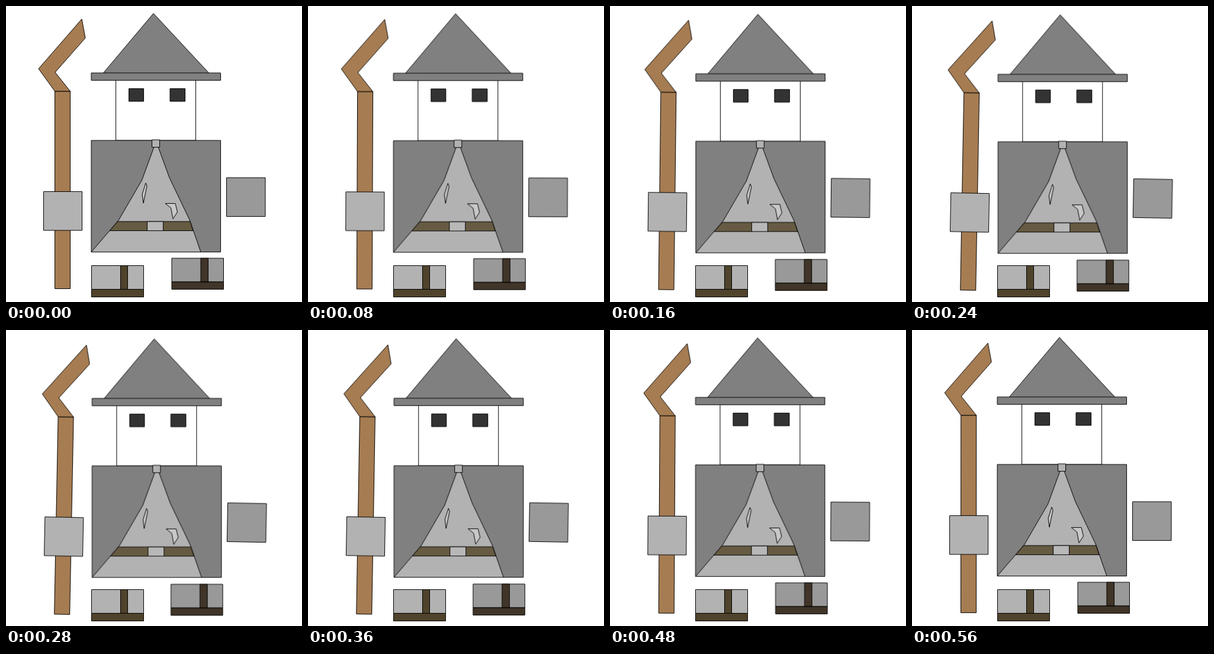
Recreate the animation shown at these times as an HTML page. Size 500 by 500 pixels, loop 0.6 s.

```html
<!DOCTYPE html>
<html lang="en">
<head>
<meta charset="utf-8">
<title>Wizard bobbing</title>
<style>
  html, body { margin: 0; width: 100%; height: 100%; overflow: hidden; background: #fff; }
  svg { display: block; width: 500px; height: 500px; }
  svg * { stroke: #000; stroke-width: 1; }
</style>
</head>
<body>
<svg viewBox="0 0 500 500">
  <g id="body">
    <path fill="#808080" d="M249 12.5 343 113.5H164Z"/>
    <path fill="#808080" d="M144 113H362.5V125.5H144Z"/>
    <path fill="#fff" d="M185.5 125.5H320.5V227H185.5Z"/>
    <path fill="#333" d="M207.5 139.5H232.5V161H207.5ZM277 139.5H302.5V161H277Z"/>
    <path fill="#808080" d="M144 227H362.5V415.5H144Z"/>
    <path fill="#b2b2b2" d="M250 238 229.5 294 190 362 144 415.5H329L310 361 276 290 257 238Z"/>
    <path fill="#665b42" d="M188.5 364H311L316 379.5H175Z"/>
    <path fill="#b8b8b8" d="M238.5 364H265.5V379.5H238.5Z"/>
    <path fill="#b2b2b2" d="M246.5 226H259.5V238.5H246.5Z"/>
    <path fill="#c8c8c8" d="M236 299 238 304 232 333 230 318Z"/>
    <path fill="#c8c8c8" d="M269 333.5H286L289.5 348 282 359.5 278.5 341Z"/>
  </g>
  <g id="staff">
    <path fill="#a67c52" d="M82.5 144H108.5V477.5H82.5Z"/>
    <path fill="#a67c52" d="M128 22 134 54 83 112 108.5 144H82.5L55 106Z"/>
    <path fill="#b2b2b2" d="M63.5 313.5H128.5V379H63.5Z"/>
  </g>
  <path id="hand" fill="#999" d="M372.5 290H438V355.5H372.5Z"/>
  <g>
    <path fill="#b2b2b2" d="M144.5 438.5H232.5V478.5H144.5Z"/>
    <path fill="#4f432c" d="M193.5 438.5H205.5V478.5H193.5ZM144.5 478.5H232.5V491.5H144.5Z"/>
  </g>
  <g id="foot">
    <path fill="#999" d="M280 426H367.5V466H280Z"/>
    <path fill="#403528" d="M329 426H341.5V466H329ZM280 466H367.5V478.5H280Z"/>
  </g>
</svg>
<script>
  const LOOP = 600, STEPS = 15, LEAD = 8;

  // Travel at the far end of the swing: shift in px, turn in degrees, pivot
  const parts = {
    body:  { x: 1.4,  y: 2.5, turn: 0,    pivot: [0, 0] },
    staff: { x: -0.86, y: 2.5, turn: 1.11, pivot: [82, 477] },
    hand:  { x: 1.5,  y: 2.6, turn: 1.11, pivot: [405.2, 322.7] },
    foot:  { x: -1.4, y: 3.5, turn: 0,    pivot: [0, 0] }
  };

  const swing = ms => (1 - Math.cos(2 * Math.PI * (ms + LEAD) / LOOP)) / 2;

  for (const [id, { x, y, turn, pivot: [px, py] }] of Object.entries(parts)) {
    const frames = [];
    for (let i = 0; i <= STEPS; i++) {
      const k = swing(i * LOOP / STEPS);
      frames.push({
        offset: i / STEPS,
        easing: 'step-end',
        transform: `translate(${px + x * k}px, ${py + y * k}px) ` +
          `rotate(${turn * k}deg) translate(${-px}px, ${-py}px)`
      });
    }
    const el = document.getElementById(id);
    el.style.transformOrigin = '0 0';
    el.animate(frames, { duration: LOOP, iterations: Infinity });
  }
</script>
</body>
</html>
```
